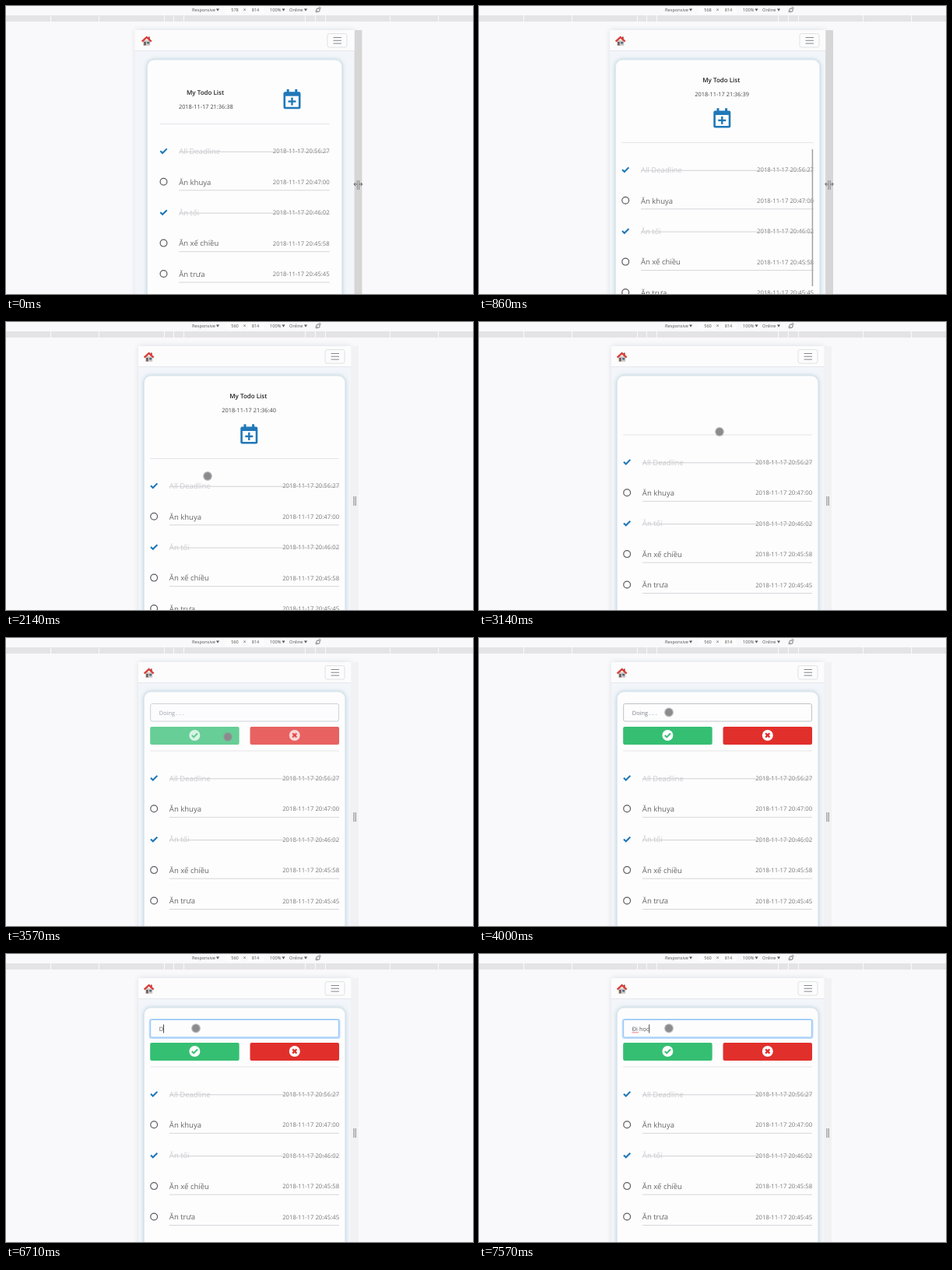
Write an HTML page with a canvas that moves like this. It is 600x370 px and loops after 8 s.

```html
<!DOCTYPE html>
<html lang="vi">
<head>
<meta charset="utf-8">
<title>Todo list</title>
<style>
  html, body { margin: 0; width: 100%; height: 100%; overflow: hidden; background: #f9f9fb; }
  canvas { display: block; }
</style>
</head>
<body>
<canvas id="stage" width="600" height="370"></canvas>
<script>
const ctx = document.getElementById('stage').getContext('2d');
const FPS = 7, LOOP = 8000, BLUE = '#1f78b8';

const todos = [
  ['All Deadline', '20:56:27', true],
  ['Ăn khuya', '20:47:00', false],
  ['Ăn tối', '20:46:02', true],
  ['Ăn xế chiều', '20:45:58', false],
  ['Ăn trưa', '20:45:45', false]
];
const typed = ['D', 'Đ', 'Đi', 'Đi h', 'Đi ho', 'Đi hoc', 'Đi học'];

// Keys are [step, value...]; values are interpolated linearly.
const widthKeys = [[0, 578], [1, 577], [4, 577], [5, 572], [8, 560]];
const pointerKeys = [[10, 438, 229], [12, 350, 220], [14, 246, 195], [15, 259, 198], [17, 303, 150],
  [18, 309, 141], [24, 309, 141], [25, 285, 127], [27, 244, 95.5]];

function track(step, keys) {
  let i = 0;
  while (i < keys.length - 2 && step > keys[i + 1][0]) i++;
  const [t0, ...a] = keys[i], [t1, ...b] = keys[i + 1];
  const p = Math.min(1, Math.max(0, (step - t0) / (t1 - t0)));
  return a.map((v, n) => v + (b[n] - v) * p);
}

function rect(x, y, w, h, color) {
  ctx.fillStyle = color;
  ctx.fillRect(x, y, w, h);
}

function box(x, y, w, h, r, fill, stroke) {
  ctx.beginPath();
  ctx.roundRect(x, y, w, h, r);
  if (fill) { ctx.fillStyle = fill; ctx.fill(); }
  if (stroke) { ctx.strokeStyle = stroke; ctx.lineWidth = 1; ctx.stroke(); }
}

function line(points, color, width = 1) {
  ctx.beginPath();
  points.forEach(([x, y]) => ctx.lineTo(x, y));
  ctx.strokeStyle = color;
  ctx.lineWidth = width;
  ctx.stroke();
}

function disc(x, y, r, fill) {
  ctx.beginPath();
  ctx.arc(x, y, r, 0, Math.PI * 2);
  ctx.fillStyle = fill;
  ctx.fill();
}

// y is the middle of the capitals.
function text(str, x, y, size, color, align = 'left', weight = 400) {
  ctx.font = `${weight} ${size}px "Open Sans", "Noto Sans", sans-serif`;
  ctx.textAlign = align;
  ctx.fillStyle = color;
  ctx.fillText(str, x, y + size * 0.36);
}

function withShadow(color, blur, draw) {
  ctx.save();
  ctx.shadowColor = color;
  ctx.shadowBlur = blur;
  draw();
  ctx.restore();
}

function faded(alpha, draw) {
  ctx.save();
  ctx.globalAlpha = alpha;
  draw();
  ctx.restore();
}

function tick(x, y, s, color, width) {
  line([[x - 4 * s, y], [x - 1.3 * s, y + 2.7 * s], [x + 4 * s, y - 2.7 * s]], color, width);
}

function toolbar(width) {
  const ink = '#555';
  rect(282, 1, 20, 9, '#fcfcfd');
  rect(311, 1, 20, 9, '#fcfcfd');
  text('Responsive', 239, 5, 5.7, ink);
  text(Math.round(width), 294, 5, 5.6, ink, 'center');
  text('×', 306.5, 5, 6.5, ink, 'center');
  text('814', 320.5, 5, 5.6, ink, 'center');
  text('100%', 339, 5, 5.7, ink);
  text('Online', 364, 5, 5.7, ink);
  for (const x of [272, 356.5, 385]) {
    ctx.beginPath();
    ctx.moveTo(x - 2, 3.5);
    ctx.lineTo(x + 2, 3.5);
    ctx.lineTo(x, 6.8);
    ctx.fill();
  }
  box(399, 3.2, 4, 4, 1, null, '#777');
  line([[398, 5.5], [398, 7.8], [400.5, 7.8]], '#777', 0.7);
  line([[401.5, 1.8], [404, 1.8], [404, 4]], '#777', 0.7);

  rect(0, 12, 600, 8, '#e4e4e6');
  for (const x of [57, 119, 203, 215, 228, 384, 397, 410, 493, 555]) rect(x, 12, 1, 8, '#f9f9fb');
}

function house(x, y) {
  rect(x - 4.5, y - 1, 9, 7, '#cfcac8');
  rect(x - 3.5, y + 1, 2.5, 4.5, '#6b5750');
  rect(x + 0.5, y + 1, 3, 2.5, '#4d6b86');
  rect(x + 2.2, y - 5.5, 1.8, 4, '#a33f3b');
  line([[x - 6, y + 0.7], [x, y - 4.8], [x + 6, y + 0.7]], '#d8403a', 2.4);
}

function calendar(x, y) {
  box(x - 11, y - 9.5, 22, 22, 2.2, BLUE);
  rect(x - 8.4, y - 4, 16.8, 14, '#fdfdfe');
  rect(x - 6.8, y - 12.7, 3, 4, BLUE);
  rect(x + 3.8, y - 12.7, 3, 4, BLUE);
  rect(x - 5, y + 1.7, 10, 2.4, BLUE);
  rect(x - 1.2, y - 2.1, 2.4, 10, BLUE);
}

function header(step, wide, left) {
  const x = wide ? 256 : 311.3, y = wide ? 111 : 95.5;
  const second = 38 + (step >= 5) + (step >= 12) + (step >= 19);
  text('My Todo List', x, y, 8, '#222', 'center', 600);
  text('2018-11-17 21:36:' + second, x + 0.8, y + 18, 7.4, '#444', 'center');
  calendar(wide ? 367.5 : 312.3, wide ? 119.7 : 144);
}

function form(step, left, right) {
  const focus = track(step, [[28, 0], [30, 1]])[0];
  const content = step >= 47 ? typed[Math.min(step - 47, 6)] : '';
  faded(focus, () => box(left - 1.5, 83, right - left + 3, 26, 3.5, '#bfdcfb'));
  box(left + 0.5, 84.5, right - left - 1, 22.5, 2, '#fdfdfe', focus > 0.5 ? '#8fc3f8' : '#bfc3c8');
  text(content || 'Doing . . .', left + 11.6, 96, 7.4, content ? '#505458' : '#7b8086');

  const caretOn = content || Math.floor((step - 30) / 3.5) % 2 === 0;
  if (step >= 30 && caretOn) {
    const offset = content ? ctx.measureText(content).width + 0.3 : 0;
    rect(left + 11.2 + offset, 90.5, 0.9, 11, '#333');
  }
  if (content.includes(' ')) {
    const wave = Array.from({ length: 9 }, (_, i) => [left + 11.5 + i, 100.3 + i % 2]);
    line(wave, '#e0443e', 0.8);
  }

  const half = 114.5;
  box(left, 114, half, 23, 2, '#35bf73');
  box(right - half, 114, half, 23, 2, '#e12f2c');
  const okX = left + half / 2, noX = right - half / 2;
  disc(okX, 125, 7, '#fff');
  tick(okX, 125, 0.9, '#35bf73', 2);
  disc(noX, 125, 7, '#fff');
  line([[noX - 2.6, 122.4], [noX + 2.6, 127.6]], '#e12f2c', 2.2);
  line([[noX + 2.6, 122.4], [noX - 2.6, 127.6]], '#e12f2c', 2.2);
}

function list(left, right, top) {
  rect(left, top, right - left, 1, '#e6e6e9');
  todos.forEach(([name, time, done], i) => {
    const y = top + 35.7 + i * 39.4, x = left + 24.7;
    text(name, x, y, 9.55, done ? '#c9c9cc' : '#666', 'left');
    text('2018-11-17 ' + time, right, y, 7.73, '#777', 'right');
    if (done) {
      tick(left + 5, y - 0.5, 1.05, BLUE, 2.1);
      rect(x, y + 0.1, right - x, 1, '#d2d2d5');
    } else {
      ctx.beginPath();
      ctx.arc(left + 5, y - 0.3, 4.4, 0, Math.PI * 2);
      ctx.strokeStyle = '#5c5c5f';
      ctx.lineWidth = 1.2;
      ctx.stroke();
      rect(x, y + 10.2, right - x, 1, '#d6d6d9');
    }
  });
}

function resizer(x, active) {
  rect(x, 31, 9.8, 339, active ? '#d6d6d7' : '#f2f2f4');
  const c = x + 4.8;
  rect(c - 1.6, 224, 1, 12, '#858588');
  rect(c + 0.7, 224, 1, 12, '#858588');
  if (!active) return;
  for (const side of [-1, 1]) {
    line([[c + side * 1.5, 229], [c + side * 5, 229]], '#555', 0.9);
    line([[c + side * 3.3, 226.8], [c + side * 5.5, 229], [c + side * 3.3, 231.2]], '#555', 0.9);
  }
}

function draw(step) {
  const [width] = track(step, widthKeys);
  const wide = width >= 576, swapped = step >= 21, dragging = step < 10;
  const x0 = 306.6 - width * 0.244, x1 = 306.6 + width * 0.244;
  const cardLeft = wide ? 181.5 : x0 + 7.4, cardRight = wide ? 431.7 : x1 - 7.4;
  const pad = wide ? 16 : 7.8;
  const left = cardLeft + pad, right = cardRight - pad;

  rect(0, 0, 600, 370, '#f9f9fb');
  toolbar(width);

  withShadow('rgba(60,80,100,.16)', 7, () => rect(x0, 31, x1 - x0, 360, '#f2f5f9'));
  resizer(x1, dragging);
  rect(x0, 31, x1 - x0, 26, '#fcfcfd');
  rect(x0, 57, x1 - x0, 1, '#e4e7eb');

  const inset = wide ? 1.5 : 0;
  house(x0 + 13.7 + inset, 45);
  const menuX = x1 - 33.2 - inset;
  box(menuX, 35.5, 25, 17.5, 2.5, null, '#dfe1e4');
  for (const y of [40, 43.8, 47.6]) rect(menuX + 7.5, y, 10.5, 1, '#85888b');

  withShadow('rgba(90,150,175,.5)', 5, () => box(cardLeft, 69, cardRight - cardLeft, 330, 9, '#fdfdfe'));
  box(cardLeft, 69, cardRight - cardLeft, 330, 9, null, '#dfe9ee');

  if (!swapped) faded(track(step, [[17, 1], [21, 0]])[0], () => header(step, wide, left));
  else faded(track(step, [[22, 0], [26, 1]])[0], () => form(step, left, right));
  list(left, right, wide ? 151 : swapped ? 144.5 : 175);

  if (step >= 5 && dragging) rect(right - 2.3, 184, 1.5, 176, '#a2a2a4');
  if (!dragging) {
    const [x, y] = track(step, pointerKeys);
    disc(x, y, 5.9, 'rgba(150,150,153,.65)');
    disc(x, y, 4.7, '#8b8a8d');
  }
}

function tickFrame() {
  ctx.textRendering = 'geometricPrecision';
  const time = performance.now() % LOOP;
  draw(Math.floor((time + 5) * FPS / 1000) % (LOOP / 1000 * FPS));
  requestAnimationFrame(tickFrame);
}
tickFrame();
</script>
</body>
</html>
```
